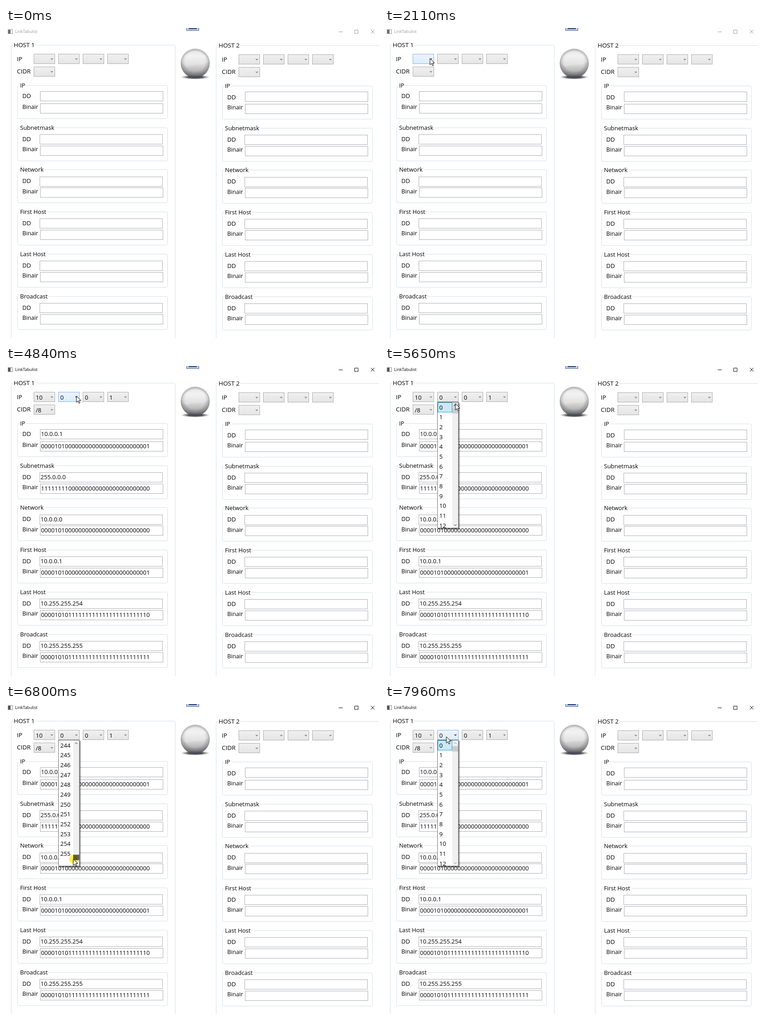
Recreate the animation shown at these times as an HTML page. Size 821 px wide and 682 px high, loop 8000 ms.

```html
<!DOCTYPE html>
<html lang="en">
<head>
<meta charset="utf-8">
<title>LinkTabulist</title>
<style>
html, body { margin: 0; width: 100%; height: 100%; overflow: hidden; background: #fff; }
#stage { display: block; width: 821px; height: 682px; }
text { font: 13.1px "Open Sans", "Noto Sans", sans-serif; fill: #000; white-space: pre; }
.frame { fill: none; stroke: #d5dfe5; }
.field { fill: #fff; stroke: #abadb3; }
.field.hot { stroke: #7eb4ea; }
.combo { fill: url(#face); stroke: #acacac; }
.combo.hot { fill: url(#faceHot); stroke: #7eb4ea; }
.mark { fill: none; stroke: #606060; stroke-width: 1.1; }
.mark.hot { stroke: #000; }
.popup { filter: drop-shadow(2.5px 2.5px 1.2px rgba(0, 0, 0, .5)); }
.pick { fill: #cbe8f6; stroke: #26a0da; }
.line { fill: none; }
.halo { fill: #fff04c; mix-blend-mode: multiply; }
</style>
</head>
<body>
<svg id="stage" viewBox="0 0 821 682">
  <defs>
    <linearGradient id="face" x2="0" y2="1">
      <stop stop-color="#f0f0f0"/><stop offset="1" stop-color="#e5e5e5"/>
    </linearGradient>
    <linearGradient id="faceHot" x2="0" y2="1">
      <stop stop-color="#ecf4fc"/><stop offset="1" stop-color="#dcecfc"/>
    </linearGradient>
    <linearGradient id="ball" x2="0" y2="1">
      <stop stop-color="#d2d2d2"/><stop offset=".25" stop-color="#ececec"/>
      <stop offset=".55" stop-color="#dadada"/><stop offset=".75" stop-color="#bababa"/>
      <stop offset=".9" stop-color="#8e8e92"/><stop offset=".96" stop-color="#4c556e"/>
    </linearGradient>
    <radialGradient id="rim" cy=".44" r=".56">
      <stop offset=".6" stop-color="#444" stop-opacity="0"/><stop offset="1" stop-color="#444" stop-opacity=".5"/>
    </radialGradient>
    <linearGradient id="gloss" x2="0" y2="1">
      <stop stop-color="#fff" stop-opacity=".4"/><stop offset="1" stop-color="#fff" stop-opacity=".15"/>
    </linearGradient>
    <radialGradient id="shade">
      <stop offset=".5" stop-color="#444" stop-opacity=".95"/><stop offset="1" stop-color="#777" stop-opacity="0"/>
    </radialGradient>
  </defs>
</svg>
<script>
const stage = document.getElementById('stage');
const LOOP = 8000;

function add(tag, attrs, parent = stage) {
  const el = document.createElementNS('http://www.w3.org/2000/svg', tag);
  for (const k in attrs) el.setAttribute(k, attrs[k]);
  parent.append(el);
  return el;
}
const set = (el, attrs) => { for (const k in attrs) el.setAttribute(k, attrs[k]); };
const show = (el, on) => { el.style.display = on ? '' : 'none'; };

function label(x, y, str, parent, size = 13) {
  const el = add('text', { x, y }, parent);
  el.style.fontSize = size + 'px';
  el.textContent = str;
  return el;
}
const chevron = (x, y, w, h, parent) =>
  add('path', { class: 'mark', d: `M${x - w} ${y - h / 2}l${w} ${h}l${w} ${-h}` }, parent);

function group(x, y, w, h, name, size) {
  add('rect', { class: 'frame', x: x + .5, y: Math.round(y) + .5, width: w, height: h, rx: 3 });
  const gap = add('rect', { x: x + 4, y: y - 4, height: 10, fill: '#fff' });
  const text = label(x + 6, y + 5, name, stage, size);
  gap.setAttribute('width', text.getComputedTextLength() + 4);
}

// Controls that react to the pointer
const controls = [];
function field(x, top) {
  const y = Math.round(top);
  const box = add('rect', { class: 'field', x: x + .5, y: y + .5, width: 270, height: 21 });
  const text = label(x + 2, y + 15, '', stage, 13.1);
  controls.push({ x, y, w: 270, h: 21.5, parts: [box], beam: true });
  return text;
}
function combo(x, y) {
  const box = add('rect', { class: 'combo', x: x + .5, y: y + .5, width: 46, height: 21 });
  const mark = chevron(x + 40, y + 11, 2.2, 2.2);
  const text = label(x + 4.5, y + 17, '', stage, 13.1);
  controls.push({ x, y, w: 47, h: 21.5, parts: [box, mark] });
  return text;
}

// Title bar
const icon = add('g', {});
add('rect', { x: 4.5, y: 3.5, width: 10, height: 9, fill: '#fff', stroke: '#8a8a8a' }, icon);
add('rect', { x: 5, y: 4, width: 5, height: 8, fill: '#555' }, icon);
const title = label(20, 11.3, 'LinkTabulist', stage, 9);
const buttons = add('path', { class: 'line', d: 'M732.5 8.5h8.5M767.5 4.5h7.5v7.5h-7.5zM803 4l8 8m0-8l-8 8' });
add('rect', { x: 397.5, y: -2, width: 27, height: 7.5, fill: '#c3d2f0', stroke: '#4a5c8c' });
add('rect', { x: 402, y: 0, width: 18, height: 2.5, fill: '#3c5084' });

// Ball
add('ellipse', { cx: 416.5, cy: 108, rx: 32, ry: 5, fill: 'url(#shade)' });
for (const fill of ['url(#ball)', 'url(#rim)']) add('circle', { cx: 416.5, cy: 77.5, r: 32, fill });
add('path', { d: 'M387 74a30 28 0 0 1 59 0q-5 7-22 7t-25 5q-9-2-12-12z', fill: 'url(#gloss)' });

// Both host panels
const names = ['IP', 'Subnetmask', 'Network', 'First Host', 'Last Host', 'Broadcast'];
function host(n, dx, dy) {
  group(11 + dx, 37 + dy, 361, 700, 'HOST ' + n, 13.4);
  label(24 + dx, 72.5 + dy, 'IP', stage, 13.4);
  label(24 + dx, 99.5 + dy, 'CIDR', stage, 13.4);
  const combos = [0, 1, 2, 3].map(i => combo(61 + 54 * i + dx, 57 + dy));
  combos.push(combo(61 + dx, 85 + dy));
  const fields = names.map((name, i) => {
    const y = 126 + 92.7 * i + dy;
    group(25 + dx, y, 330, 73, name);
    label(36 + dx, y + (i ? 30 : 28 + 2 * dy), 'DD');
    label(36 + dx, y + 52.3, 'Binair', stage, 12.7);
    return [field((i ? 74 : 75) + dx, y + (i ? 15.3 : 13)), field(75 + dx, y + 40)];
  });
  return { combos, fields };
}
const left = host(1, 0, 0);
host(2, 451, 1);

const dotted = n => [24, 16, 8, 0].map(s => n >>> s & 255).join('.');
const binary = n => (n >>> 0).toString(2).padStart(32, '0');
function results(ip, bits) {
  const mask = -1 << 32 - bits, net = ip & mask, last = net | ~mask;
  return [ip, mask, net, net + 1, last - 1, last].map(n => [dotted(n), binary(n)]);
}
const ip = 10 << 24 | 1;
const answers = results(ip, 8);
const choices = [...dotted(ip).split('.'), '/8'];

// Drop-down lists
const ROW = 21.65;
function popup(x, y, h) {
  const g = add('g', { class: 'popup' });
  const view = add('svg', { x, y, width: 47, height: h, overflow: 'hidden' }, g);
  const body = add('g', {}, view);
  add('rect', { x: .5, y: .5, width: 46, height: h - 1, fill: '#fff', stroke: '#6b6b6b' }, body);
  return { g, view, body, x, y, w: 47, h };
}
const small = popup(61, 79, 67);
const smallPick = add('rect', { class: 'pick', x: 1.5, y: 1.5, width: 44, height: 21 }, small.body);
smallPick.style.fill = '#b3e2f9';
[10, 172, 192].forEach((n, i) => label(5, 16.7 + ROW * i, n, small.body, 13.1));

const big = popup(115, 79, 278);
const bigPick = add('rect', { class: 'pick', x: 1.5, y: 1.5, width: 31, height: 21 }, big.body);
const rows = Array.from({ length: 13 }, (_, i) => label(4.5, 16.7 + ROW * i, '', big.body, 13.1));
add('rect', { x: 33, y: 1, width: 13, height: 276, fill: '#f0f0f0' }, big.body);
const upFace = add('rect', { x: 33, y: 1, width: 13, height: 12, fill: '#dadada' }, big.body);
const thumb = add('rect', { x: 33, width: 13, height: 12 }, big.body);
const upMark = add('path', { class: 'mark', d: 'M37 9l2.7-3l2.7 3' }, big.body);
const downMark = chevron(39.7, 271, 2.7, 3, big.body);
add('path', { d: 'M0 277.5h47', stroke: '#6b6b6b' }, big.body);

// Pointer
const halo = add('circle', { class: 'halo', cx: .5, cy: .5, r: 9.5 });
const arrow = add('path', {
  d: 'M0 0V14L3.3 10.9L5.5 16L7.8 15L5.6 10H10Z', fill: '#fff', stroke: '#000', 'stroke-linejoin': 'round'
});
const beam = add('path', { class: 'line', stroke: '#222', d: 'M-3-7.5h2.5L0-7l.5-.5H3M0-7V7M-3 7.5h2.5L0 7l.5.5H3' });

// Bursts of change: first time, last time, steps
const bursts = [
  [1310, 2110, 12], [2300, 2370, 2], [2510, 2580, 2], [2830, 3230, 7], [3510, 3710, 3], [4040, 4430, 7],
  [4630, 4980, 6], [5120, 5920, 12], [5980, 6730, 12], [6800, 7560, 11], [7630, 7960, 6]
];
function stepped(t) {
  let last = 0;
  for (const [a, b, n] of bursts) {
    if (t < a) break;
    const gap = (b - a) / (n - 1);
    last = Math.min(b, a + Math.floor((t - a) / gap + .001) * gap);
  }
  return last;
}

// Pointer path: time, x, y
const path = [
  [1310, 600, 612], [2110, 99, 67], [2765, 99, 67], [3100, 91, 86], [3230, 89, 89], [3975, 89, 89],
  [4430, 155, 66], [5190, 155, 66], [5650, 155, 83], [5920, 155, 101], [5980, 155, 101],
  [6800, 148, 341], [7560, 157, 79], [7630, 157, 79], [7960, 135, 72]
];
function pointer(t) {
  const i = path.findIndex(p => p[0] > t);
  if (i < 1) return (i ? path[path.length - 1] : path[0]).slice(1);
  const [a, ax, ay] = path[i - 1], [b, bx, by] = path[i];
  const p = (t - a) / (b - a), e = p * p * (3 - 2 * p);
  return [ax + (bx - ax) * e, ay + (by - ay) * e];
}

const presses = [[2300, 2370], [3510, 3610], [4910, 4980], [5980, 7630]];
const within = (t, [a, b]) => t >= a - 1 && t < b - 1;
const inside = (x, y, r) => x >= r.x && x < r.x + r.w && y >= r.y && y < r.y + r.h;

function drop(list, t, from, to) {
  const on = within(t, [from, to]);
  show(list.g, on);
  if (!on) return false;
  const h = t < from + 60 ? list.h * .55 : list.h;
  list.view.setAttribute('height', h);
  list.body.setAttribute('transform', `translate(0 ${h - list.h})`);
  return true;
}

function draw(time) {
  const t = stepped(time);
  const [x, y] = pointer(t);
  const seen = t >= 1310;
  const drag = within(t, presses[3]);
  const active = t >= 2300;

  title.style.fill = active ? '#000' : '#999';
  icon.setAttribute('opacity', active ? 1 : .85);
  buttons.setAttribute('stroke', active ? '#000' : '#999');

  const overSmall = drop(small, t, 2510, 3610) && inside(x, y, small);
  const overBig = drop(big, t, 5120, LOOP + 9) && inside(x, y, big);

  let typing = false;
  for (const c of controls) {
    const hot = seen && !overSmall && !overBig && !drag && inside(x, y, c);
    c.parts.forEach(p => p.classList.toggle('hot', hot));
    if (hot && c.beam) typing = true;
  }

  const done = t >= 3709;
  left.combos.forEach((el, i) => { el.textContent = done ? choices[i] : ''; });
  left.fields.forEach((pair, i) => pair.forEach((el, j) => { el.textContent = done ? answers[i][j] : ''; }));

  show(smallPick, overSmall && y < 102);

  const slide = drag ? Math.max(0, Math.min(239, y - 101)) : 0;
  const first = Math.round(slide / 239 * 244);
  rows.forEach((el, i) => { el.textContent = first + i < 256 ? first + i : ''; });
  show(bigPick, first === 0);
  const onBar = overBig && x >= 148;
  const onUp = onBar && !drag && y < 92;
  const onThumb = onBar && y >= 92 && y < 104;
  set(thumb, { y: 13.5 + slide, fill: drag ? '#606060' : onThumb ? '#a6a6a6' : '#cdcdcd' });
  show(upFace, onUp);
  upMark.style.stroke = onUp ? '#000' : onBar || drag ? '#606060' : '#a0a0a0';
  downMark.style.stroke = onBar || drag ? '#606060' : '#a0a0a0';

  const place = `translate(${x.toFixed(1)} ${y.toFixed(1)})`;
  for (const el of [halo, arrow, beam]) el.setAttribute('transform', place);
  show(halo, presses.some(p => within(t, p)));
  show(arrow, seen && !typing);
  show(beam, seen && typing);
}

const start = performance.now();
function tick() {
  draw((performance.now() - start) % LOOP);
  requestAnimationFrame(tick);
}
tick();
</script>
</body>
</html>
```
